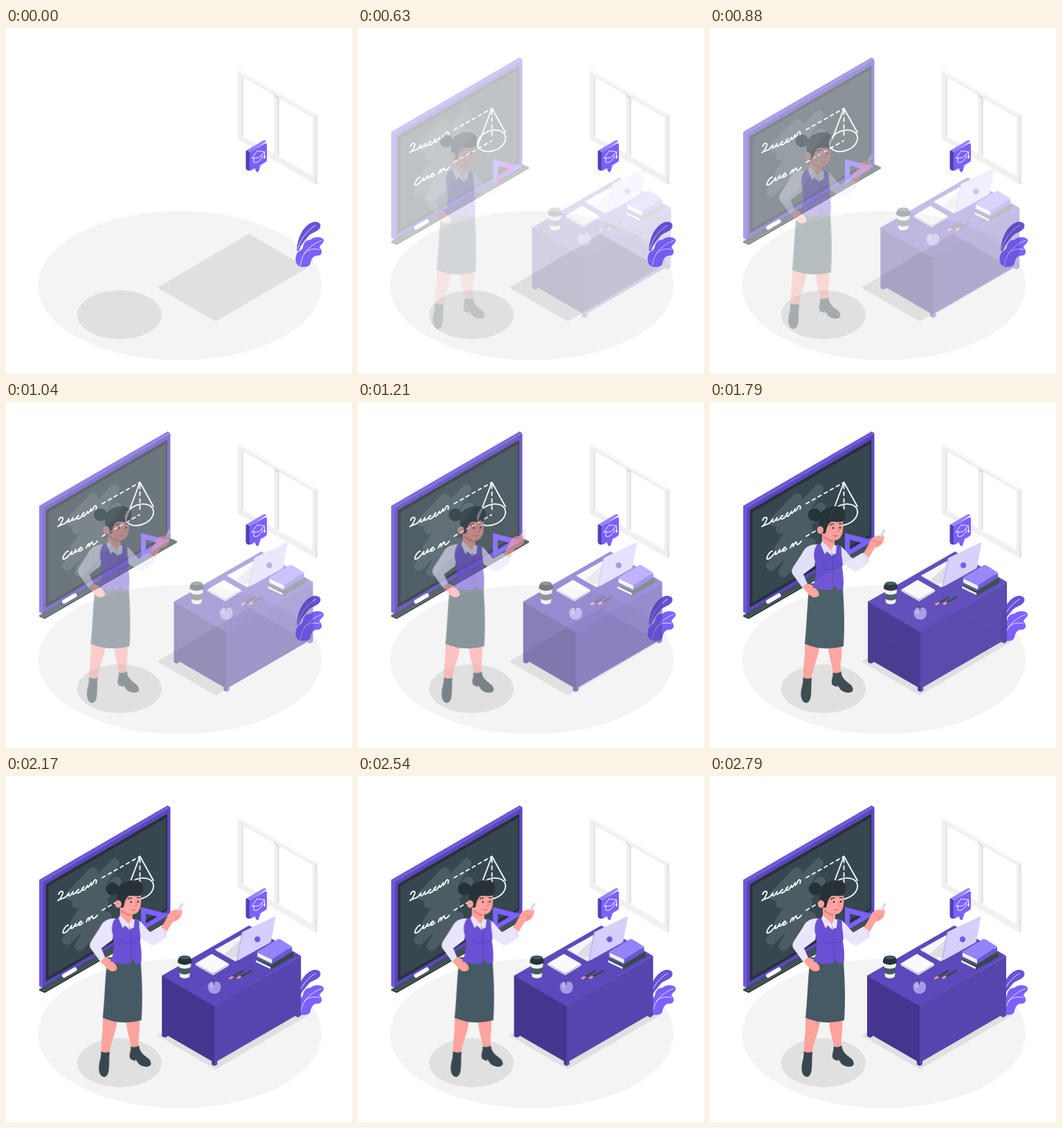
An HTML page that plays this animation: 500 by 500 pixels, repeating every 2830 ms.

```html
<!DOCTYPE html>
<html lang="en">
<head>
<meta charset="utf-8">
<title>Classroom</title>
<style>
  html, body { margin: 0; width: 100%; height: 100%; overflow: hidden; background: #fff; }
  svg { display: block; width: 100%; height: 100%; }
  #board, #teacher, #desk { animation: 2830ms infinite both; }
  #board { animation-name: fade; }
  #teacher { --from: -30px; animation-name: slide; }
  #desk { --from: 30px; animation-name: slide; }
  @keyframes fade {
    0% { opacity: 0; animation-timing-function: cubic-bezier(.36, -.01, .5, 1.38); }
    74%, 100% { opacity: 1; }
  }
  @keyframes slide {
    0% { opacity: 0; transform: translateX(var(--from)); animation-timing-function: cubic-bezier(.36, -.01, .5, 1.38); }
    98.4%, 100% { opacity: 1; transform: none; }
  }
  .line { fill: none; stroke: #fff; stroke-linecap: round; stroke-linejoin: round; }
  .skin { fill: #ffa39d; }
  .ink { fill: #263238; }
  .slate { fill: #37474f; }
  .shirt { fill: #e9e5fc; }
  .violet { fill: #7b61ff; }
</style>
</head>
<body>
<svg viewBox="0 0 500 500">
  <!-- floor and shadows -->
  <ellipse cx="251" cy="372.3" rx="205" ry="107.8" fill="#f4f4f4"/>
  <ellipse cx="164" cy="414.4" rx="61" ry="35.3" fill="#e0e0e0"/>
  <path d="M218.500 375 351 297.500 435.500 346.500 303 424Z" fill="#e0e0e0"/>

  <!-- window -->
  <g>
    <path fill="#f0f0f0" fill-rule="evenodd" d="M335 62 338 60 450 125V225L447 226 335 161ZM342 71V156L443 214V129Z"/>
    <path fill="#fafafa" d="M335 62 338 60 450 125 447 127Z"/>
    <path fill="#e5e5e5" d="M447 127 450 125V225L447 226ZM340.500 70 343 71.500V155L340.500 156.500ZM392 101 395 102V183.500L392 185Z"/>
    <path fill="#f0f0f0" d="M387.500 97 392 100V185L387.500 182.500Z"/>
    <path fill="#dcdcdc" d="M387.500 96 395 100V103L387.500 99Z"/>
  </g>

  <!-- speech bubble -->
  <g>
    <path fill="#5440b8" d="M346.500 179Q346.500 176 349 177L353 180V206L350 206Q346.500 205 346.500 202ZM359 203 363 208.500 365 206Z"/>
    <path fill="#9682fb" d="M348 176.500 370 163.500Q374 161 376.500 163.500L353 180Z"/>
    <path class="violet" d="M352 183Q352 180 355 178L373 167.500Q377 165 377 169V190Q377 193 374 194.500L368 198 364.500 208.500 360 202.500 355 205.500Q352 207 352 203Z"/>
    <path class="line" stroke-width=".9" d="M355.500 188 363 177.500 373.500 179 366 187ZM358.500 187.500 358 194Q364 196.500 370 187V183.500M373.500 179V187M372.500 187.500 373.500 183.500 374.500 187.500Z"/>
  </g>

  <!-- plant -->
  <g>
    <path fill="#6753d6" d="M420.500 322C420 304 431 282 446 280C455 280 456 286 453 290C448 296 441 295 436 302C430 310 426 313 423 322Z"/>
    <path class="violet" d="M426 345C418 343 417 334 420 327C422 321 427 323 429 317C430 309 435 306 440 306C445 301 456 301 459 306C460 312 453 313 453 317C458 322 457 328 451 329C444 328 441 334 440 340C439 345 432 346 426 345Z"/>
    <path class="line" stroke-width=".8" d="M421.500 319Q428 297 447 285M425.500 343C427 330 434 316 456 307M431 325Q440 317 453 320"/>
  </g>

  <!-- blackboard -->
  <g id="board">
    <path fill="#6d58da" d="M48 150 233.500 42.500 237.500 45 53 152.500V306L48 303.500Z"/>
    <path fill="#5b46c0" d="M53 152.500 237.500 45V199L53 306Z"/>
    <path class="ink" d="M57.500 156.500 233 54.500V194.500L57.500 297Z"/>
    <path class="slate" d="M61.500 159 231 60.500V191.500L61.500 290Z"/>
    <path d="M93 173 126 139 102 184 157 126 100 212 160 152 88 237 141 184 106 246 146 203" fill="none" stroke="#4b5c64" stroke-width="14" stroke-linecap="round" stroke-linejoin="round"/>
    <path fill="#3f5159" d="M48 308 237.500 197 247 201 56 311Z"/>
    <path class="ink" d="M48 308 56 311 247 201V203L56 313.500 48 310Z"/>
    <path class="line" stroke-width="6" d="M84 288.500 99.500 279.500"/>
    <g class="line" stroke-width="1.8">
      <path d="M76 171C78 165 84 166 82 170C80 175 77 179 75 180C80 176 83 178 87 174L91 169C88 176 93 174 97 167C95 173 98 172 102 167C106 162 106 164 102 167C102 171 107 169 110 164C114 158 113 159 110 163C111 167 114 165 118 158C117 163 120 161 123 154C121 160 125 158 127 152C129 148 132 150 130 155"/>
      <path d="M90 216C90 213 83 220 82 226C84 230 91 222 95 216C92 223 97 221 101 213C98 219 102 218 106 212C109 208 111 210 106 213C104 217 107 217 111 212M116 211C119 204 121 202 120 209C123 202 126 200 125 205C126 208 130 204 132 201"/>
      <path d="M193.500 116 173.500 169M193.500 116 213 151"/>
      <ellipse cx="193" cy="163" rx="21" ry="14.500" transform="rotate(-22 193 163)"/>
      <path stroke-dasharray="5 5" d="M139 147 192 117M139 194 193 163M193.500 120V160"/>
    </g>
    <path class="violet" fill-rule="evenodd" d="M195 189.500 237 200 195 225ZM202 199V214L219 203.500Z"/>
  </g>

  <!-- teacher -->
  <g id="teacher">
    <path class="skin" d="M138 350 159 354C157 373 149 384 147.500 402H136C135 382 139 369 138 350ZM172 353 191 351C193 367 188 379 190.500 393H179C178 379 172 369 172 353Z"/>
    <path class="slate" d="M135.500 398Q142 401 148 398.500C147 409 148 418 146.500 427Q145 434 140 435C134 434 132 427 132.500 420C133 412 136 408 135.500 398ZM178.500 391Q185 393 190.500 389.500C191 400 199 404 205 409Q209 414 207 418C202 422 195 420 190 416L185 409V412L178 409C175 402 179 400 178.500 391Z"/>
    <path fill="#455a64" d="M145 262H192.500C195 294 196 324 194 353Q165 361 138 349.500C141 322 141 295 145 262Z"/>
    <path class="shirt" d="M157 206C146 205 138 210 134 219L121 239Q117 246 122 251L135 269 142 263 136 249 152 237Z"/>
    <path class="skin" d="M135 268 141 262Q148 265 158 267L154 270Q160 275 158 280Q155 283 150 282C144 280 141 274 135 268Z"/>
    <path class="skin" d="M221 220C227 214 230 205 234 198Q239 193 245 193L251 192Q254 195 252 200C251 206 246 209 239 211L229 228Z"/>
    <path class="shirt" d="M188 208C195 210 199 219 207 226L221 218Q230 222 231 228L229 234 214 244Q208 246 202 240L190 232Z"/>
    <path d="M207 227 213 224M222 219Q228 223 229 233" fill="none" stroke="#cfc8ee" stroke-width=".8"/>
    <path d="M248.500 193 252.500 185.500" stroke="#dedede" stroke-width="4" stroke-linecap="round"/>
    <path d="M236 201Q242 198 243 203L249 202M241 207 248 204" fill="none" stroke="#eb837d" stroke-width=".8"/>
    <path class="skin" d="M163 188V209L176 219 181 210V198Z"/>
    <path fill="#6a51d3" d="M156 206 164 204 177 221 183 206Q190 206 191 212C190 222 194 229 192 239Q195 255 193.500 270L186 272 180 264 178 271Q164 273 149 268C155 255 155 244 153 231C150 222 151 212 156 206Z"/>
    <path d="M163 236Q168 245 178 241Q189 242 192 234M179 223V264" fill="none" stroke="#503bb0" stroke-width=".8"/>
    <path class="shirt" d="M163 201 175 213 178 223 170 216 167 220 161 206ZM180 206 184 208 183 219 178 221 176 214Z"/>
    <path class="skin" d="M164 169 190 165C194 171 194 181 192.500 189Q190 199 182 200Q174 200 166 193Z"/>
    <path d="M165 192Q170 198 179 200L178 203Q170 201 165 196Z" fill="#eb837d"/>
    <circle class="ink" cx="152" cy="163" r="9.300"/>
    <path class="ink" d="M160 181C156 167 161 155 172 153C180 149 191 150 195 156C198 162 196 169 192 173C187 174 182 173 177 173C171 175 170 182 168 190L162 190Z"/>
    <ellipse class="skin" cx="160.500" cy="185" rx="4.600" ry="5.600"/>
    <path d="M158 183Q161 182 162 187" fill="none" stroke="#eb837d" stroke-width=".8"/>
    <g class="ink">
      <ellipse cx="179" cy="182" rx="1.200" ry="1.600"/>
      <ellipse cx="189" cy="181.500" rx="1.200" ry="1.600"/>
    </g>
    <path d="M174.500 178Q177 175.500 180 176.500M187.500 176Q189.500 175 191.500 176.500" fill="none" stroke="#263238" stroke-width="1.200" stroke-linecap="round"/>
    <path d="M185.500 181 187.500 187 184.500 188" fill="none" stroke="#e56f6b" stroke-width=".9"/>
    <path d="M178 192Q182 194 186 192.500Q183 196 178 192Z" fill="#b94a52"/>
  </g>

  <!-- desk -->
  <g id="desk">
    <path fill="#46358f" d="M227 288 303 332V419L299 417V412L235 375V376.500L231 378 227 376Z"/>
    <path fill="#5645ad" d="M303 332 428 260V346L424 349 420 347V346.500L307 412V417L303 419Z"/>
    <path fill="#5c49bb" d="M227 288.500 353 216 428 260 303 332.500Z"/>

    <!-- laptop -->
    <path fill="#d6d6de" d="M304.500 252 333 268 337 266V262L304.500 249Z"/>
    <path fill="#f6f6f8" d="M304.500 250.500 341 230 345 233 337 265 333 266.500Z"/>
    <path fill="#dddde4" d="M318 257 341 236 337 261 329 263Z"/>
    <path fill="#b9aff0" d="M334.500 266 342.500 226 344.500 224.500 338 265Z"/>
    <path fill="#d6cffb" d="M336 266 344 226Q344 225 346 224L390 203Q392 203 391 206L385 238Q385 240 383 241L338 266Z"/>
    <circle cx="365" cy="236" r="4.200" fill="#6f58e0"/>

    <!-- paper -->
    <path fill="#dcdce0" d="M275.500 271 301 286 324 271.500V274L301 288 275.500 273.500Z"/>
    <path fill="#fafafa" d="M275.500 271 299 257 324 271.500 301 285.500Z"/>

    <!-- cup -->
    <path fill="#f2f2f2" d="M251 271H269L267 290Q260 295 253 290Z"/>
    <path fill="#455a64" d="M251 276Q260 281 269 276L268 284.500Q260 289 252 284.500Z"/>
    <path class="ink" d="M251.500 263Q252 259.500 260 259.500T268.500 263L270 266V270Q260 276 250 270V266Z"/>
    <ellipse cx="260" cy="262.500" rx="7.500" ry="2.200" fill="#455a64"/>

    <!-- apple -->
    <path fill="#a999ea" d="M303 298C308 295 313 300 312 306C311 312 307 315 303 314.500C297 315 293 310 293.500 304C294 298 299 296 303 298Z"/>
    <ellipse cx="298.500" cy="303" rx="2.500" ry="3.500" fill="#bfb2f3"/>
    <path d="M302.500 301Q302.500 297 300 295" fill="none" stroke="#37474f" stroke-width="1.300" stroke-linecap="round"/>

    <!-- pencils -->
    <g fill="none" stroke-width="3">
      <path d="M326 292 345 281.500M337 292 357 281" stroke="#37474f"/>
      <path d="M324.500 293 330 290M336 292.500 341 289.500" stroke="#f39a9a"/>
    </g>

    <!-- books -->
    <path class="ink" d="M362 266 384 279 417 260V254L385 272Z"/>
    <path fill="#455a64" d="M362 265 395 246 417 255 384 274Z"/>
    <path fill="#f4f4f4" d="M363 266 384 276V279L363 269Z"/>
    <path class="slate" d="M384 273 417 254V261L384 280Z"/>
    <path fill="#f0f0f4" d="M365 255 386 265V271L365 261Z"/>
    <path fill="#6c55d8" d="M386 264 415 247V253.500L386 271.500Z"/>
    <path fill="#9583fb" d="M364 254 394 236Q396 235 398 236L415 246.500 386 265Z"/>
    <path d="M364 254V261.500L386 272.500" fill="none" stroke="#6c55d8" stroke-width="1.200"/>
  </g>
</svg>
</body>
</html>
```
